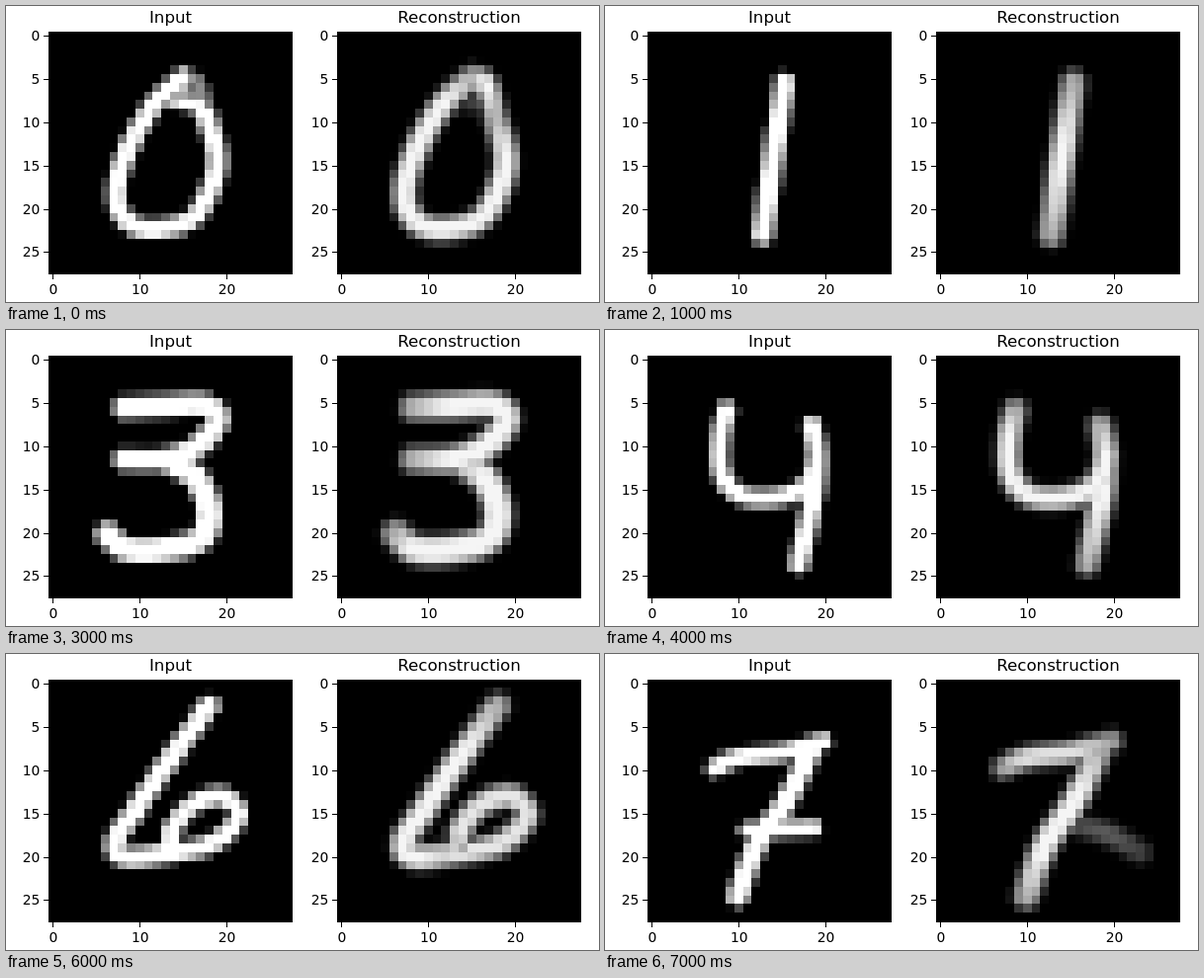
Write an HTML page that moves like this. It is 600 px wide and 300 px high and loops after 8 s.

```html
<!DOCTYPE html>
<html lang="en">
<head>
<meta charset="utf-8">
<title>Digits</title>
<style>
html, body { margin: 0; width: 100%; height: 100%; overflow: hidden; background: #fff; }
svg { display: block; width: 600px; height: 300px; }
text { font-family: "DejaVu Sans", Verdana, sans-serif; font-size: 13.89px; fill: #000; }
.title { font-size: 16.67px; }
</style>
</head>
<body>
<svg id="stage" viewBox="0 0 600 300"></svg>
<script>
const N = 28, SIZE = 246, CELL = SIZE / N, TOP = 25, HOLD = 1000;
const stage = document.getElementById('stage');
const clamp = v => Math.max(0, Math.min(1, v));

function add(tag, attrs, text) {
  const el = document.createElementNS('http://www.w3.org/2000/svg', tag);
  for (const k in attrs) el.setAttribute(k, attrs[k]);
  if (text !== undefined) el.textContent = text;
  stage.appendChild(el);
  return el;
}
const box = (x, y, width, height, fill = '#000') =>
  add('rect', { x, y, width, height, fill, 'shape-rendering': 'crispEdges' });
const label = (x, y, anchor, text, cls = '') =>
  add('text', { x, y, 'text-anchor': anchor, class: cls }, text);

// Samples a Catmull-Rom curve through the key points.
function curve(text, steps = 14) {
  const keys = text.split(', ').map(p => p.split(' ').map(Number));
  const at = i => keys[Math.max(0, Math.min(keys.length - 1, i))];
  const pts = [];
  for (let i = 0; i < keys.length - 1; i++) {
    for (let j = 0; j <= steps; j++) {
      const t = j / steps;
      pts.push([0, 1].map(k => {
        const [a, b, c, d] = [-1, 0, 1, 2].map(o => at(i + o)[k]);
        return b + t / 2 * (c - a + t * (2 * a - 5 * b + 4 * c - d + t * (3 * (b - c) + d - a)));
      }));
    }
  }
  return pts;
}

// Half width in cells, then ink strength in the input and in the reconstruction.
const stroke = (keys, half, ink = 1, copy = 0.96) => ({ pts: curve(keys), half, ink, copy });

const digits = [
  [
    stroke('15 4.9, 11.3 8.5, 8.1 14.5, 7.3 19, 9 21.8, 12.5 22.3, 16.5 20.7, 18.9 15, 17.7 9.4', 1.1),
    stroke('17.7 9.4, 16.3 8, 14.5 7.7', 0.9, 1, 0.3),
    stroke('14.8 4.9, 16.6 5.6, 17.7 9.4', 1, 0.55)
  ],
  [
    stroke('15.3 5.5, 14 14, 12.8 23', 1.15)
  ],
  [
    stroke('11.1 7.9, 14 6.9, 18 5.7, 21.2 7.2, 21.2 11, 18.5 15.3', 1.45),
    stroke('18.8 15, 14 18.7, 8 21.1, 5 20.2, 6.2 17, 10.5 14.4', 1.3),
    stroke('9 14.8, 12 14, 15 14.1, 18.3 15.2', 1.15),
    stroke('18.3 15.2, 19.7 17, 20.9 19.1', 1.15, 1, 0.55)
  ],
  [
    stroke('8.2 5.6, 13 5.4, 17.5 5.3, 19 7, 16.8 9.9, 13 11.5, 8.2 11.6', 1.25),
    stroke('13.5 11.8, 16.5 13.8, 18 17.5, 17 20.7, 13 21.9, 8.5 21.9, 6.3 20.2', 1.4)
  ],
  [
    stroke('8.6 5.9, 7.9 9, 8 13, 10 15.6, 14 16, 17.6 14.7, 19 11.5, 18.4 7.6', 1.05),
    stroke('19 11.5, 18.6 16, 16.9 23.6', 1.1)
  ],
  [
    stroke('18.8 5.6, 12 6, 10.8 11.2, 15 12.3, 17.2 16.5, 14.8 21, 11 21.8, 8.6 20.4', 1.15)
  ],
  [
    stroke('18 2.6, 13.7 8.5, 9.6 14.5, 7.1 18.4, 8.6 20.1, 14 19.5', 1.15),
    stroke('9 20.1, 14 19.5, 18.5 18.4, 21.4 15.3, 19.5 13.1, 16 14.1, 13.7 17, 14 19.2', 1.05, 1, 0.9)
  ],
  [
    stroke('7.2 9.8, 10 8.6, 15 8, 19.7 6.7', 1, 1, 0.88),
    stroke('18.3 7.8, 15.5 13.5, 12 18.8, 9.9 24.6', 1.2),
    stroke('11 17, 18.6 16.7', 0.95, 1, 0),
    stroke('15 16.2, 19 17.3, 23 19.5', 1, 0, 0.35)
  ]
];

// Crisp edges in the input; the reconstruction is blurred and fades at stroke ends.
function shade({ pts, half, ink, copy }, x, y, blurred) {
  let near = Infinity, at = 0;
  pts.forEach(([px, py], i) => {
    const d = Math.hypot(x - px, y - py);
    if (d < near) { near = d; at = i; }
  });
  if (!blurred) return ink * clamp(half - near + 0.5);
  const k = clamp((half + 0.2 - near) / 1.9 + 0.5);
  const end = Math.min(at, pts.length - 1 - at);
  return copy * k * k * (3 - 2 * k) * (0.7 + 0.3 * clamp(end / 12));
}

// Nearest-neighbour cell edge, in whole pixels.
const edge = i => Math.ceil(i * CELL - 0.5);

function panel(left, title) {
  label(left + 123.5, 17, 'middle', title, 'title');
  box(left, TOP + 1, SIZE + 1, SIZE);
  for (let v = 0; v <= 25; v += 5) {
    const y = Math.round(TOP + 0.4 + (v + 0.5) * CELL);
    box(left - 5, y, 5, 1);
    label(left - 8.6, y + 5, 'end', v);
  }
  for (let v = 0; v <= 20; v += 10) {
    const x = left + (v + 0.5) * CELL;
    box(Math.round(x), TOP + SIZE + 1, 1, 5);
    label(x + 0.5, 292, 'middle', v);
  }
  const cells = [];
  for (let row = 1; row < N; row++) {
    for (let col = 0; col < N; col++) {
      const x = edge(col), y = edge(row);
      const el = box(left + x, TOP + y, edge(col + 1) - x, edge(row + 1) - y);
      cells.push({ el, col, row });
    }
  }
  return cells;
}

function paint(cells, strokes, blurred) {
  for (const { el, col, row } of cells) {
    const v = Math.round(255 * Math.max(...strokes.map(s => shade(s, col, row, blurred))));
    el.setAttribute('fill', `rgb(${v},${v},${v})`);
  }
}

const input = panel(43, 'Input');
const output = panel(335, 'Reconstruction');

let shown = -1;
function render(ms) {
  const k = Math.floor(ms / HOLD) % digits.length;
  if (k === shown) return;
  shown = k;
  paint(input, digits[k], false);
  paint(output, digits[k], true);
}

const start = performance.now();
function tick() {
  render(performance.now() - start);
  requestAnimationFrame(tick);
}
tick();
</script>
</body>
</html>
```
